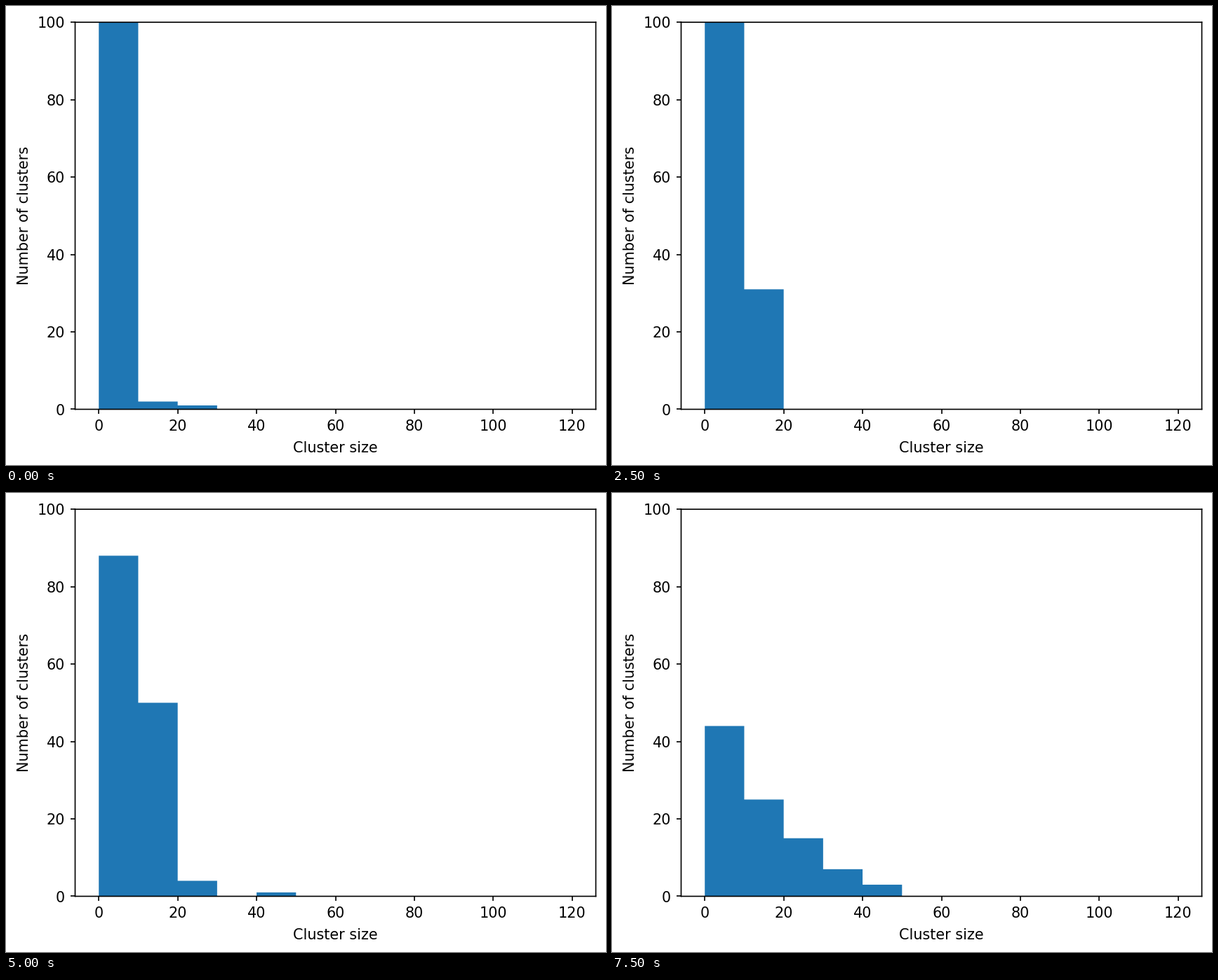
Write a matplotlib script that moves like this. It is 855 px wide and 655 px high and loops after 8 s.

```python
import numpy as np
import matplotlib.pyplot as plt
from matplotlib.animation import FuncAnimation

W, H, DPI = 855, 655, 150
LEFT, RIGHT, TOP, BOTTOM = 98.5, 840.5, 23.2, 575.5
STEPS, BIN = 16, 10


def track(step, *points):
    """Straight-line path through (step, value) points."""
    return np.interp(step, *zip(*points))


def tiny(step):
    # small clusters die out as they merge
    return 20 + 68 * np.exp(-0.206 * (step - 10))


def small(step):
    # logistic growth, then a quadratic decline
    growth = 52 / (1 + np.exp(-0.76 * (step - 4.45)))
    return growth - 0.76 * max(step - 9, 0) ** 2


def counts(step):
    return np.rint([
        tiny(step),
        small(step),
        track(step, (0, 1), (1, 0), (5, 0), (6, 2), (8, 1), (10, 4), (15, 15.4)),
        track(step, (7, 0), (8, 1), (9, 0), (10.5, 0), (15, 7)),
        track(step, (9, 0), (10, 1), (11, 0), (12, 2), (13, 1), (15, 3)),
    ])


plt.rcParams.update({
    "font.family": "DejaVu Sans",
    "font.size": 9.97,
    "path.snap": False,
})

fig = plt.figure(figsize=(5.7, 4.3667), dpi=DPI, facecolor="white")
ax = fig.add_axes([LEFT / W, 1 - BOTTOM / H,
                   (RIGHT - LEFT) / W, (BOTTOM - TOP) / H])
start = counts(0)
hist = ax.stairs(start, BIN * np.arange(len(start) + 1),
                 fill=True, color="#1f77b4")
ax.set(xlim=(-6, 126), ylim=(0, 100),
       xticks=range(0, 121, 20), yticks=range(0, 101, 20))
ax.set_xlabel("Cluster size", labelpad=5)
ax.set_ylabel("Number of clusters")


def update(step):
    hist.set_data(values=counts(step))
    return [hist]


anim = FuncAnimation(fig, update, frames=STEPS, interval=500,
                     repeat=True, repeat_delay=0, blit=False)
plt.show()
```
